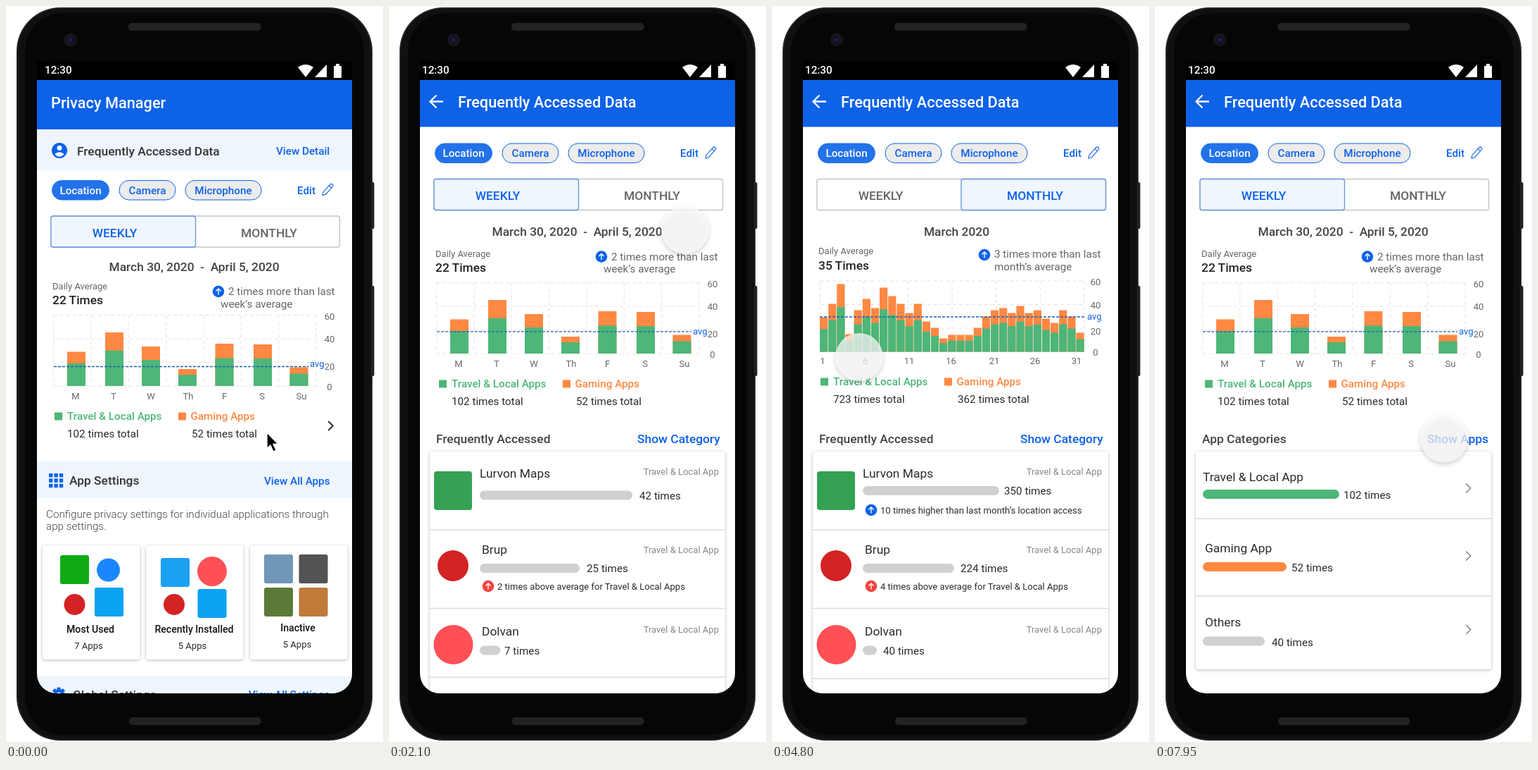
These frames come from a looping animation (536 by 1044 pixels, 8000 ms). An HTML page:

```html
<!DOCTYPE html>
<html lang="en">
<head>
<meta charset="utf-8">
<title>Privacy Manager</title>
<style>
html, body { margin: 0; width: 100%; height: 100%; overflow: hidden; background: #fff; }
svg { display: block; font-family: Roboto, sans-serif; }
.card { filter: drop-shadow(0 1px 2px rgba(0,0,0,.28)); }
.lifted { filter: drop-shadow(0 3px 3px rgba(0,0,0,.24)); }
</style>
</head>
<body>
<svg id="stage" width="536" height="1044" viewBox="0 0 536 1044"></svg>
<script>
const UNIT = 448 / 412; // screen pixels per design pixel
const BLUE = '#0d62e8', GREEN = '#4db678', ORANGE = '#ff8843', GREY = '#d0d0d0',
      INK = '#2b2b2b', SOFT = '#666', PALE = '#eef5fd', RED = '#d32323';

// Shape helpers; text is placed by the middle of its capitals.
const text = (x, y, s, size, fill = INK, weight = 400, anchor = 'start') =>
  `<text x="${x}" y="${(y + size * UNIT * .355).toFixed(1)}" font-size="${(size * UNIT).toFixed(2)}" fill="${fill}" font-weight="${weight}" text-anchor="${anchor}">${s}</text>`;
const bold = (x, y, s, size, fill, anchor) => text(x, y, s, size, fill, 500, anchor);
const rect = (x, y, w, h, fill, r = 0, extra = '') =>
  `<rect x="${x}" y="${y}" width="${w}" height="${h}" rx="${r}" fill="${fill}" ${extra}/>`;
const circle = (x, y, r, fill, extra = '') => `<circle cx="${x}" cy="${y}" r="${r}" fill="${fill}" ${extra}/>`;
const line = (d, stroke, width = 1, extra = '') =>
  `<path d="${d}" fill="none" stroke="${stroke}" stroke-width="${width}" ${extra}/>`;
const shift = (dx, dy, s) => `<g transform="translate(${dx} ${dy})">${s}</g>`;
const list = (n, f) => Array.from({ length: n }, (_, i) => f(i)).join('');
const chevron = (x, y, h, color, width) => line(`M${x - h / 2} ${y - h}l${h} ${h}l${-h} ${h}`, color, width);
const upArrow = (x, y, color) => circle(x, y, 8.3, color) +
  line(`M${x} ${y + 4.5}v-8.5m-3.6 3.6l3.6 -3.6l3.6 3.6`, '#fff', 1.4);

function statusBar(timeX, iconX) {
  return bold(timeX, 90.5, '12:30', 14, '#fff') + shift(iconX, 0,
    '<path fill="#fff" d="M415 87Q426 79 437 87L426 101ZM439 101L456 83V101ZM466 85h3v-3h5v3h3v17h-11z"/>');
}

function controls(weekly) {
  const chip = (x, w, label, on) =>
    rect(x + .5, 195, w, 27.5, on ? '#2272ea' : '#ececec', 13.75, `stroke="${on ? '#2272ea' : BLUE}"`) +
    bold(x + w / 2 + .5, 209, label, 14, on ? '#fff' : BLUE, 'middle');
  const tab = (x, w, cx, label, on) =>
    (on ? rect(x, 245.5, w, 44, '#f0f6fe', 3, 'stroke="#5e93d8" stroke-width="1.3"') : '') +
    bold(cx, 269, label, 16, on ? BLUE : '#666', 'middle');
  return chip(65, 81, 'Location', true) + chip(160.5, 80, 'Camera') + chip(254.5, 108, 'Microphone') +
    bold(414, 209, 'Edit', 14, BLUE) +
    line('M450 216l1 -4.5l10 -11.2q1.5 -1 3 .2t.5 3l-10 11.2zM459 202.5l3.6 3.2', BLUE, 1.1) +
    rect(64, 245.5, 410.5, 44, '#fff', 3, 'stroke="#c4c4c4" stroke-width="1.4"') +
    tab(64, 205.5, 154.5, 'WEEKLY', weekly) + tab(269, 205.5, 374, 'MONTHLY', !weekly);
}

function grid(x, y, w, columns) {
  return line(list(4, i => `M${x} ${y + i * 33.5}h${w}`) +
    list(columns + 1, i => `M${x + i * w / columns} ${y}v100.5`), '#e2e2e2', 1, 'stroke-dasharray="5 4"');
}

// Two thirds of each bar belong to the travel apps.
const bar = (x, base, w, h) =>
  rect(x, base - h, w, h, ORANGE) + rect(x, base - h * .66, w, h * .66, GREEN);
const average = (y, x2) => line(`M68 ${y}H${x2}`, '#1f5fb5', 1.3, 'stroke-dasharray="4 2"');
const scale = ys => ys.map((y, i) => text(460, y, 60 - i * 20, 12, SOFT, 400, 'middle')).join('');

function legend(x, y, travel, gaming) {
  return rect(x, y - 5, 11, 11, GREEN) + bold(x + 18, y, 'Travel &amp; Local Apps', 14, GREEN) +
    text(x + 18, y + 25.5, travel + ' times total', 14) +
    rect(x + 176, y - 5, 11, 11, ORANGE) + bold(x + 193.5, y, 'Gaming Apps', 14, ORANGE) +
    text(x + 195, y + 25.5, gaming + ' times total', 14);
}

const weekHeading = () =>
  bold(267.5, 320, 'March 30, 2020\u00a0 -\u00a0 April 5, 2020', 16, '#444', 'middle') +
  upArrow(302, 355.5, BLUE) + text(316, 355.5, '2 times more than last', 14, SOFT) +
  text(305, 373, 'week’s average', 14, SOFT);

function weekChart(averageY, legendX) {
  const days = [['M', 87, 48.5, 99], ['T', 141, 76, 153], ['W', 193, 56, 206], ['Th', 245, 24, 259],
                ['F', 297.5, 60, 310.5], ['S', 352, 59, 364], ['Su', 403.5, 26.5, 420]];
  return text(66, 351, 'Daily Average', 12, SOFT) + bold(66, 371, '22 Times', 16, '#222') +
    grid(67.5, 392.5, 373.5, 7) + scale([394, 426.5, 465, 494.5]) +
    days.map(([d, x, h, cx]) => bar(x, 493, 26, h) + text(cx, 507, d, 12, SOFT, 400, 'middle')).join('') +
    average(averageY, 430) + text(432, 461.5, 'avg', 12, BLUE) + legend(legendX, 535.5, 102, 52);
}

function monthChart() {
  const heights = [49, 68, 96, 25, 59, 75, 62, 91, 79, 68, 55, 68, 43, 34, 19, 24,
                   24, 24, 34, 50, 59, 62, 55, 65, 55, 59, 47, 41, 59, 50, 27];
  return bold(262.5, 320, 'March 2020', 16, '#444', 'middle') +
    text(66, 347.5, 'Daily Average', 12, SOFT) + bold(66, 368, '35 Times', 16, '#222') +
    upArrow(302, 353, BLUE) + text(316, 352, '3 times more than last', 14, SOFT) +
    text(316, 370, 'month’s average', 14, SOFT) +
    grid(68, 390, 376, 6) + scale([391, 424, 461.5, 491.5]) +
    heights.map((h, i) => bar(68 + i * 12.15, 490.5, 11.2, h)).join('') +
    [72, 132.5, 195, 254.5, 316, 374, 433].map((x, i) => text(x, 503, 1 + i * 5, 12, SOFT, 400, 'middle')).join('') +
    average(441, 444) + text(448, 440.5, 'avg', 12, BLUE) + legend(69, 532.5, 723, 362);
}

function appList(monthly) {
  const last = monthly ? 954 : 952;
  const row = (x, y, name, labelY, barY, barW, timesX, times) =>
    text(x, y, name, 16) + text(469, labelY, 'Travel &amp; Local App', 12, '#888', 400, 'end') +
    rect(129, barY - 6.5, barW, 13, GREY, 6.5) + text(timesX, barY + .5, times + ' times', 14);
  const note = (y, color, s) => upArrow(141, y, color) + text(154, y + .5, s, 12);
  return bold(67, 613.5, 'Frequently Accessed', 16, '#444') + bold(353, 613.5, 'Show Category', 16, BLUE) +
    rect(58, 632, 420, 380, '#fff', 4, 'class="card"') + line(`M58 743H478M58 854.5H478M58 ${last}H478`, '#dcdcdc', 1.4) +
    rect(64, 660, 54, 55, '#35a253', 4) + circle(91, 794, 22, RED) + circle(91.5, 906, 28, '#ff5056') +
    (monthly
      ? row(129, 663, 'Lurvon Maps', 660, 687.5, 194, 330, 350) + note(715, BLUE, '10 times higher than last month’s location access') +
        row(132, 771, 'Brup', 771, 797.5, 130, 268, 224) + row(132, 886.5, 'Dolvan', 884.5, 914, 20, 158, 40)
      : row(129, 663, 'Lurvon Maps', 660, 694, 217, 356, 42) +
        row(132, 771, 'Brup', 771, 797.5, 142, 281, 25) + row(132, 886.5, 'Dolvan', 884.5, 914, 29.5, 164, 7)) +
    note(823, '#f8423d', `${monthly ? 4 : 2} times above average for Travel &amp; Local Apps`);
}

function categoryList() {
  const row = (x, y, name, barY, barW, color, timesX, times, arrowY) =>
    text(x, y, name, 16) + rect(68, barY - 6.5, barW, 13, color, 6.5) +
    text(timesX, barY + 1.5, times + ' times', 14) + chevron(445.5, arrowY, 6.5, '#777', 1.3);
  return bold(67, 613.5, 'App Categories', 16, '#444') + bold(387, 613.5, 'Show Apps', 16, BLUE) +
    rect(58, 632, 420, 309, '#fff', 4, 'class="card"') + line('M58 727H478M58 837H478', '#dcdcdc', 1.4) +
    row(68, 668, 'Travel &amp; Local App', 692.5, 194, GREEN, 268, 102, 684) +
    row(71, 769, 'Gaming App', 795.5, 119, ORANGE, 194, 52, 780) +
    row(71, 873.5, 'Others', 901, 88, GREY, 166, 40, 884.5);
}

const detail = (weekly, body) => statusBar(47, 2) + rect(44, 105, 448, 66.5, BLUE) +
  line('M77 135.5H59M67.5 126.5l-9 9l9 9', '#fff', 2.3) +
  bold(98, 136, 'Frequently Accessed Data', 20, '#fff') +
  controls(weekly) + (weekly ? weekHeading() + weekChart(461.8, 71) : monthChart()) + body;

function home() {
  const card = (x, cx, y, name, cx2, count) => rect(x, 765, 138.5, 162, '#fff', 4, 'class="card"') +
    bold(cx, y, name, 13, '#111', 'middle') + text(cx2, y + 23.5, count + ' Apps', 12, INK, 400, 'middle');
  const tile = (x, y, color) => rect(x, y, 41, 41, color, 3);
  const gear = circle(75, 977, 8, BLUE) +
    list(8, i => rect(72.5, 966.5, 5, 6, BLUE, 1, `transform="rotate(${i * 45} 75 977)"`)) + circle(75, 977, 3.5, PALE);
  return statusBar(55, 0) + rect(44, 105, 448, 70, BLUE) + bold(64, 137, 'Privacy Manager', 20, '#fff') +
    rect(44, 175, 448, 58, PALE) + circle(76, 205, 11, BLUE) + circle(76, 201.5, 3.4, '#fff') +
    '<path fill="#fff" d="M69.2 210.2q6.8 -6 13.6 0q-6.8 7 -13.6 0z"/>' +
    bold(101, 205.5, 'Frequently Accessed Data', 16, '#333') + bold(384, 206, 'View Detail', 14, BLUE) +
    shift(0, 52.5, controls(true)) + shift(0, 49.5, weekHeading()) + shift(0, 46, weekChart(465.5, 69)) +
    chevron(461.5, 595.5, 6.5, '#333', 2) +
    rect(44, 646, 448, 52, PALE) + list(9, i => rect(61 + i % 3 * 7.4, 663 + (i / 3 | 0) * 7.4, 5.4, 5.4, BLUE)) +
    bold(90, 673, 'App Settings', 16, '#333') + bold(367, 673.5, 'View All Apps', 14, BLUE) +
    text(57, 720.5, 'Configure privacy settings for individual applications through', 14, '#444', 300) +
    text(57, 738, 'app settings.', 14, '#444', 300) +
    card(52, 120, 884, 'Most Used', 117.5, 7) + card(199, 267.5, 883.5, 'Recently Installed', 265, 5) +
    card(347, 415, 881.5, 'Inactive', 414, 5) +
    tile(77, 779, '#10ab14') + circle(145.5, 800, 16.5, '#1a86ff') + circle(97.5, 849, 15, RED) + tile(126, 825, '#0ca2f2') +
    tile(220, 783, '#1da1f2') + circle(293, 802, 21, '#ff5056') + circle(239, 849, 15, RED) + tile(272.5, 827, '#0ca2f2') +
    tile(367, 778, '#7096b8') + tile(416.5, 778, '#555254') + tile(367, 825, '#5b7a38') + tile(416.5, 825, '#c07a3a') +
    rect(44, 951, 448, 30, PALE) + gear + bold(95, 976.5, 'Global Settings', 16, '#333') +
    bold(345, 977, 'View All Settings', 14, BLUE);
}

const phone = rect(517, 250, 6.5, 66, '#1c1c1c', 2) + rect(517, 397, 6.5, 128, '#1c1c1c', 2) +
  rect(15, 2, 506, 1040, '#232323', 62) + rect(17, 4, 502, 1036, '#101010', 60) + rect(27, 10, 482, 1024, '#060606', 54) +
  rect(174, 24, 188.5, 11, '#232323', 5) + rect(175, 1009, 187.5, 11, '#232323', 5) +
  circle(92, 48, 9.5, '#15151a') + circle(92, 48, 5, '#12122e') + circle(92, 48, 2, '#24245a') +
  rect(44, 78, 448, 27, '#000');

const scenes = {
  home: home(),
  week: detail(true, appList(false)),
  month: detail(false, appList(true)),
  categories: detail(true, categoryList())
};

const stage = document.getElementById('stage');
stage.innerHTML = `<defs><clipPath id="screen"><path d="M44 70H492V947a28 28 0 0 1 -28 28H72a28 28 0 0 1 -28 -28z"/></clipPath></defs>
${phone}<g clip-path="url(#screen)">${rect(44, 105, 448, 880, '#fff')}
${Object.entries(scenes).map(([id, s]) => `<g id="${id}">${s}</g>`).join('')}</g>
<g id="pointer"><path id="arrow" d="M0 0V22.5L5 18L9 27L13 25.2L9 16.5H16Z" stroke="#fff" stroke-width="1.3"/>
${circle(0, 0, 34, '#fff', 'id="touch" fill-opacity=".72"')}</g>`;
const el = id => document.getElementById(id);

const LOOP = 8000;
const cuts = [[0, 'home'], [1050, 'week'], [3500, 'month'], [5900, 'week'], [7750, 'categories']];
const path = [[0, 371, 605], [300, 371, 605], [800, 461, 596], [1200, 461, 596], [1300, 452, 593],
  [1700, 432, 450], [2300, 417, 271], [3500, 417, 271], [4100, 124, 498], [5000, 124, 498],
  [5600, 168, 264], [6100, 168, 264], [7000, 411, 613.5], [LOOP, 411, 613.5]];

function pointerAt(t) {
  const i = path.findIndex(p => p[0] > t);
  const [t0, x0, y0] = path[i - 1], [t1, x1, y1] = path[i];
  const u = (t - t0) / (t1 - t0), k = u * u * (3 - 2 * u);
  return [x0 + (x1 - x0) * k, y0 + (y1 - y0) * k];
}

function draw(now) {
  const t = now % LOOP;
  const current = cuts.filter(c => c[0] <= t).pop()[1];
  for (const id in scenes) el(id).style.display = id === current ? '' : 'none';
  const isArrow = t < 300, pressed = t > 5700 && t < 6000;
  el('pointer').setAttribute('transform', `translate(${pointerAt(t)})`);
  el('arrow').style.display = isArrow ? '' : 'none';
  el('touch').style.display = isArrow ? 'none' : '';
  el('touch').setAttribute('class', pressed ? '' : 'lifted');
  el('touch').setAttribute('fill-opacity', pressed ? .5 : .72);
}

let start;
function tick(now) {
  start ??= now;
  draw(now - start);
  requestAnimationFrame(tick);
}
draw(0);
requestAnimationFrame(tick);
</script>
</body>
</html>
```
